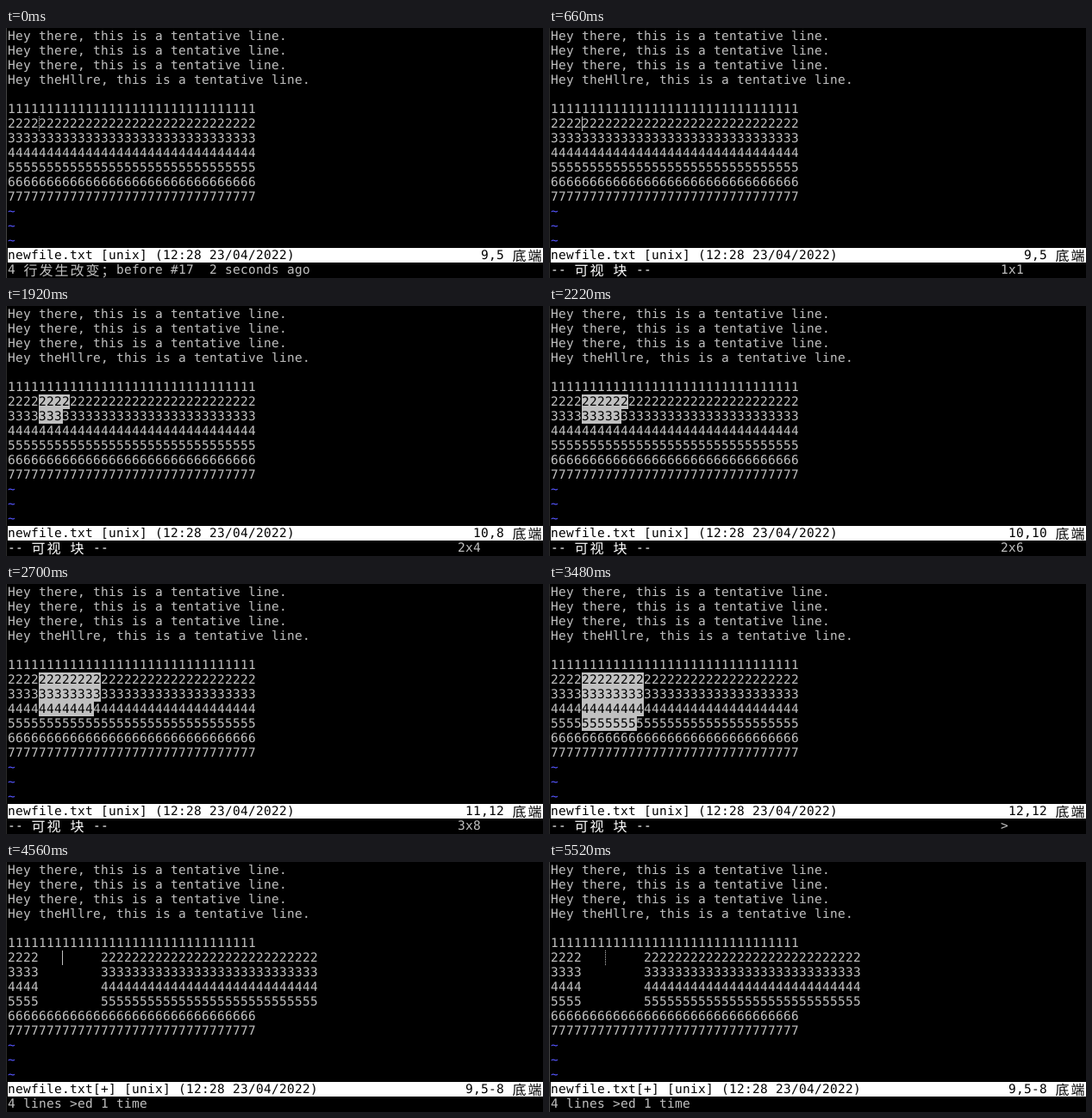
Write an HTML page that moves like this. It is 623 px wide and 291 px high and loops after 5580 ms.

```html
<!DOCTYPE html>
<html lang="zh-CN">
<head>
<meta charset="utf-8">
<title>Block indent</title>
<style>
  html, body { margin: 0; width: 100%; height: 100%; overflow: hidden; background: #000; }
  svg { display: block; width: 623px; height: 291px; }
  rect, line { shape-rendering: crispEdges; }
  text {
    font: 14.5px "DejaVu Sans Mono", "Noto Sans Mono", monospace;
    letter-spacing: .27px;
    white-space: pre;
    text-rendering: geometricPrecision;
  }
  .wide {
    font: 16px "Noto Sans CJK SC", "Noto Sans CJK", sans-serif;
    letter-spacing: 2px;
  }
</style>
</head>
<body>
<svg id="screen" viewBox="0 0 623 291"></svg>
<script>
const LOOP = 5580, CELL = 9, LINE = 17, COLS = 69;
const GREY = '#c0c0c0', BLACK = '#000', WHITE = '#fff', BLUE = '#5555ff';
const ANCHOR = { row: 6, col: 4 }, LAST_ROW = 9, SHIFT = 8, WIDTH = 32;
const VISUAL = '-- 可视 块 --';

const left = col => 2 + col * CELL;
const topOf = row => 1 + row * LINE;
const screen = document.getElementById('screen');

// Each step changes only the listed parts of the state.
const steps = [
  [0, { row: 6, col: 4, caret: 'dotted', focus: false, selecting: false, shifted: false,
        pos: '9,5', cmd: '', msg: '4 行发生改变；before #17  2 seconds ago' }],
  [240, { caret: 'on', focus: true }],
  [660, { selecting: true, cmd: '1x1', msg: VISUAL }],
  [1020, { row: 7, pos: '10,5', cmd: '2x1' }],
  ...[1620, 1740, 1920, 2040, 2220, 2340, 2460].map((time, i) =>
    [time, { col: 5 + i, pos: `10,${6 + i}`, cmd: `2x${2 + i}` }]),
  [2700, { row: 8, pos: '11,12', cmd: '3x8' }],
  [2820, { row: 9 }],
  [2880, { pos: '12,12', cmd: '4x8' }],
  [3360, { caret: 'off' }],
  [3480, { caret: 'on', cmd: '>' }],
  [3540, { row: 6, col: 7, selecting: false, shifted: true,
           pos: '9,5-8', cmd: '', msg: '4 lines >ed 1 time' }],
  [4020, { caret: 'off' }],
  [4560, { caret: 'on' }],
  [5040, { caret: 'off' }],
  [5520, { caret: 'dotted', focus: false }]
];

function add(tag, attrs, text) {
  const el = document.createElementNS('http://www.w3.org/2000/svg', tag);
  for (const key in attrs) el.setAttribute(key, attrs[key]);
  if (text) el.textContent = text;
  screen.append(el);
}

function box(x, y, width, height, fill) {
  add('rect', { x, y, width, height, fill });
}

// Writes on the character grid; Chinese characters take two cells.
function write(row, col, text, fill = GREY) {
  for (const run of text.match(/[\u3000-\uffff]+|[^\u3000-\uffff]+/g) || []) {
    const wide = run[0] >= '\u3000';
    add('text', {
      x: left(col) + (wide ? .6 : .1),
      y: topOf(row) + (wide ? 14.5 : 13),
      fill,
      class: wide ? 'wide' : ''
    }, run);
    col += run.length * (wide ? 2 : 1);
  }
}

function digitRow(s, row) {
  const digit = String(row - 4);
  const start = ANCHOR.col;
  const inBlock = row >= ANCHOR.row && row <= LAST_ROW;
  if (s.shifted && inBlock) {
    write(row, 0, digit.repeat(start));
    write(row, start + SHIFT, digit.repeat(WIDTH - start));
    return;
  }
  // The cell under the caret stays unmarked.
  const marked = s.selecting && inBlock && row <= s.row
    ? s.col - start + (row < s.row ? 1 : 0) : 0;
  box(left(start), topOf(row), marked * CELL, LINE, GREY);
  write(row, 0, digit.repeat(start));
  write(row, start, digit.repeat(marked), BLACK);
  write(row, start + marked, digit.repeat(WIDTH - start - marked));
}

function caret(s) {
  if (s.caret === 'off') return;
  const x = left(s.col) + .5, y = topOf(s.row);
  add('line', {
    x1: x, x2: x, y1: y, y2: y + LINE, stroke: GREY,
    'stroke-dasharray': s.caret === 'dotted' ? '1 1' : 'none'
  });
}

function draw(s) {
  screen.replaceChildren();
  box(0, 0, 623, 291, BLACK);
  box(0, 0, 1, 291, s.focus ? '#2a2a2a' : '#444');

  for (let row = 0; row < 4; row++) {
    write(row, 0, `Hey the${row === 3 ? 'Hll' : ''}re, this is a tentative line.`);
  }
  for (let row = 5; row < 12; row++) digitRow(s, row);
  for (let row = 12; row < 15; row++) write(row, 0, '~', BLUE);
  caret(s);

  box(2, topOf(15), COLS * CELL, LINE, WHITE);
  write(15, 0, `newfile.txt${s.shifted ? '[+]' : ''} [unix] (12:28 23/04/2022)`, BLACK);
  write(15, 64 - s.pos.length, s.pos + ' 底端', BLACK);
  write(16, 0, s.msg, s.msg === VISUAL ? WHITE : GREY);
  write(16, 58, s.cmd);
}

let shown = -1;
function tick() {
  const time = performance.now() % LOOP;
  const current = steps.filter(([start]) => start <= time);
  if (current.length !== shown) {
    shown = current.length;
    draw(Object.assign({}, ...current.map(([, change]) => change)));
  }
  requestAnimationFrame(tick);
}
tick();
</script>
</body>
</html>
```
